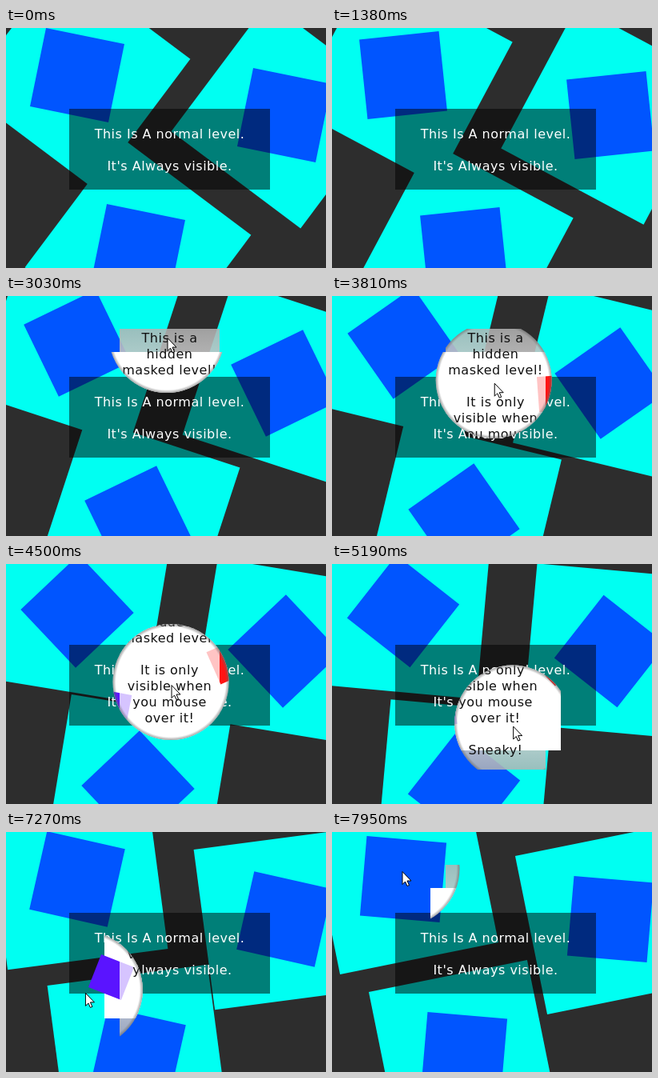
An HTML page with a canvas that plays this animation: 400x300 px, repeating every 8000 ms.

```html
<!DOCTYPE html>
<html lang="en">
<head>
<meta charset="utf-8">
<title>Masked level</title>
<style>
  html, body { margin: 0; width: 100%; height: 100%; overflow: hidden; background: #2d2d2d; }
  canvas { display: block; }
</style>
</head>
<body>
<canvas id="stage" width="400" height="300"></canvas>
<script>
const ctx = document.getElementById('stage').getContext('2d');
const LOOP = 8000;
const MASK_RADIUS = 72.5;

// Bursts of evenly spaced steps: start ms, end ms, number of steps.
const bursts = [
  [40, 790, 17], [850, 1620, 17], [1660, 2450, 16], [2490, 3260, 17], [3320, 4080, 16],
  [4140, 4930, 17], [4980, 5770, 17], [5840, 6630, 18], [6680, 7450, 16], [7510, 7950, 9]
];

// Pointer tip: ms, x, y.
const pointerPath = [
  [1900, 200, -80], [3030, 201.5, 52], [4500, 206.5, 151],
  [5980, 231, 244], [7270, 99, 201], [7950, 87.5, 49]
];

const tiles = [[89, 59], [348, 109], [165, 279]];
const hiddenLines = [
  'This is a', 'hidden', 'masked level!', '', 'It is only',
  'visible when', 'you mouse', 'over it!', '', 'Sneaky!'
];

function stepAt(time) {
  let step = 0;
  for (const [start, end, count] of bursts) {
    if (time < start) break;
    const progress = Math.min(1, (time - start) / (end - start));
    step += 1 + Math.floor(progress * (count - 1) + 0.001);
  }
  return step;
}

// Smooth curve through the path points (cubic Hermite).
function pointerAt(time) {
  const path = pointerPath;
  if (time < path[0][0]) return null;
  let i = 0;
  while (i < path.length - 2 && time >= path[i + 1][0]) i++;
  const span = path[i + 1][0] - path[i][0];
  const u = Math.min(1, (time - path[i][0]) / span);
  const slope = (k, axis) => {
    const a = path[Math.max(0, k - 1)], b = path[Math.min(path.length - 1, k + 1)];
    return (b[axis] - a[axis]) / (b[0] - a[0]);
  };
  return [1, 2].map(axis =>
    (1 + 2 * u) * (1 - u) ** 2 * path[i][axis] +
    u * (1 - u) ** 2 * span * slope(i, axis) +
    u * u * (3 - 2 * u) * path[i + 1][axis] +
    u * u * (u - 1) * span * slope(i + 1, axis));
}

function rect(color, x, y, w, h) {
  ctx.fillStyle = color;
  ctx.fillRect(x, y, w, h);
}

function square(color, x, y, size, degrees) {
  ctx.save();
  ctx.translate(x, y);
  ctx.rotate(degrees * Math.PI / 180);
  rect(color, -size / 2, -size / 2, size, size);
  ctx.restore();
}

function text(color, line, y) {
  ctx.fillStyle = color;
  ctx.fillText(line, 204.5, y);
}

function shade(y0, y1, from, to) {
  const gradient = ctx.createLinearGradient(0, y0, 0, y1);
  gradient.addColorStop(0, from);
  gradient.addColorStop(1, to);
  return gradient;
}

function drawLevel(step) {
  rect('#2d2d2d', 0, 0, 400, 300);
  for (const [x, y] of tiles) square('#00fff2', x, y, 202, 36.87 - 0.302 * step);
  for (const [x, y] of tiles) square('#0055ff', x, y, 100, 11.54 - 0.604 * step);
  rect('rgba(0,0,0,.5)', 79, 101, 251, 101);
  text('#fff', 'This Is A normal level.', 138);
  text('#fff', "It's Always visible.", 178);
}

function drawHidden(step, x, y) {
  ctx.save();
  ctx.beginPath();
  ctx.arc(x, y, MASK_RADIUS, 0, Math.PI * 2);
  ctx.clip();

  const far = 'rgba(180,180,180,.85)', near = 'rgba(195,195,195,.88)';
  rect(shade(41, 70, far, near), 142, 41, 125, 29);
  rect(shade(233, 257, near, far), 142, 233, 125, 24);
  rect('#fff', 123, 70, 163, 163);
  square('#5a14ff', 131.5, 181.5, 44, 20 - 1.42 * (step - 148));
  square('#ff1414', 279.5, 121.5, 44, -24 - 1.42 * (step - 91));
  rect('rgba(255,255,255,.75)', 142, 70, 125, 163);
  hiddenLines.forEach((line, i) => text('#111', line, 58 + 20 * i));

  // Soft grey rim on the revealed area only
  ctx.beginPath();
  ctx.rect(123, 70, 163, 163);
  ctx.rect(142, 41, 125, 29);
  ctx.rect(142, 233, 125, 24);
  ctx.clip();
  const rim = ctx.createRadialGradient(x, y, MASK_RADIUS - 4, x, y, MASK_RADIUS);
  rim.addColorStop(0, 'rgba(100,100,100,0)');
  rim.addColorStop(1, 'rgba(100,100,100,.6)');
  rect(rim, 0, 0, 400, 300);
  ctx.restore();
}

function drawPointer(x, y) {
  ctx.save();
  ctx.translate(x, y);
  const arrow = new Path2D('M.5 .5V16.5L4 13L6.5 18.5L9 17.5L6.5 12H11.5Z');
  ctx.fillStyle = '#fff';
  ctx.fill(arrow);
  ctx.strokeStyle = '#000';
  ctx.lineWidth = 1;
  ctx.stroke(arrow);
  ctx.restore();
}

function draw(now) {
  const time = now % LOOP;
  const step = stepAt(time);
  const pointer = pointerAt(time);
  ctx.font = '16px "DejaVu Sans", sans-serif';
  ctx.letterSpacing = '0.5px';
  ctx.textAlign = 'center';
  drawLevel(step);
  if (pointer) {
    const [x, y] = pointer;
    drawHidden(step, x - 0.5, y - 3.5);
    drawPointer(x, y);
  }
}

const begin = performance.now();
function tick() {
  draw(performance.now() - begin);
  requestAnimationFrame(tick);
}
tick();
</script>
</body>
</html>
```
